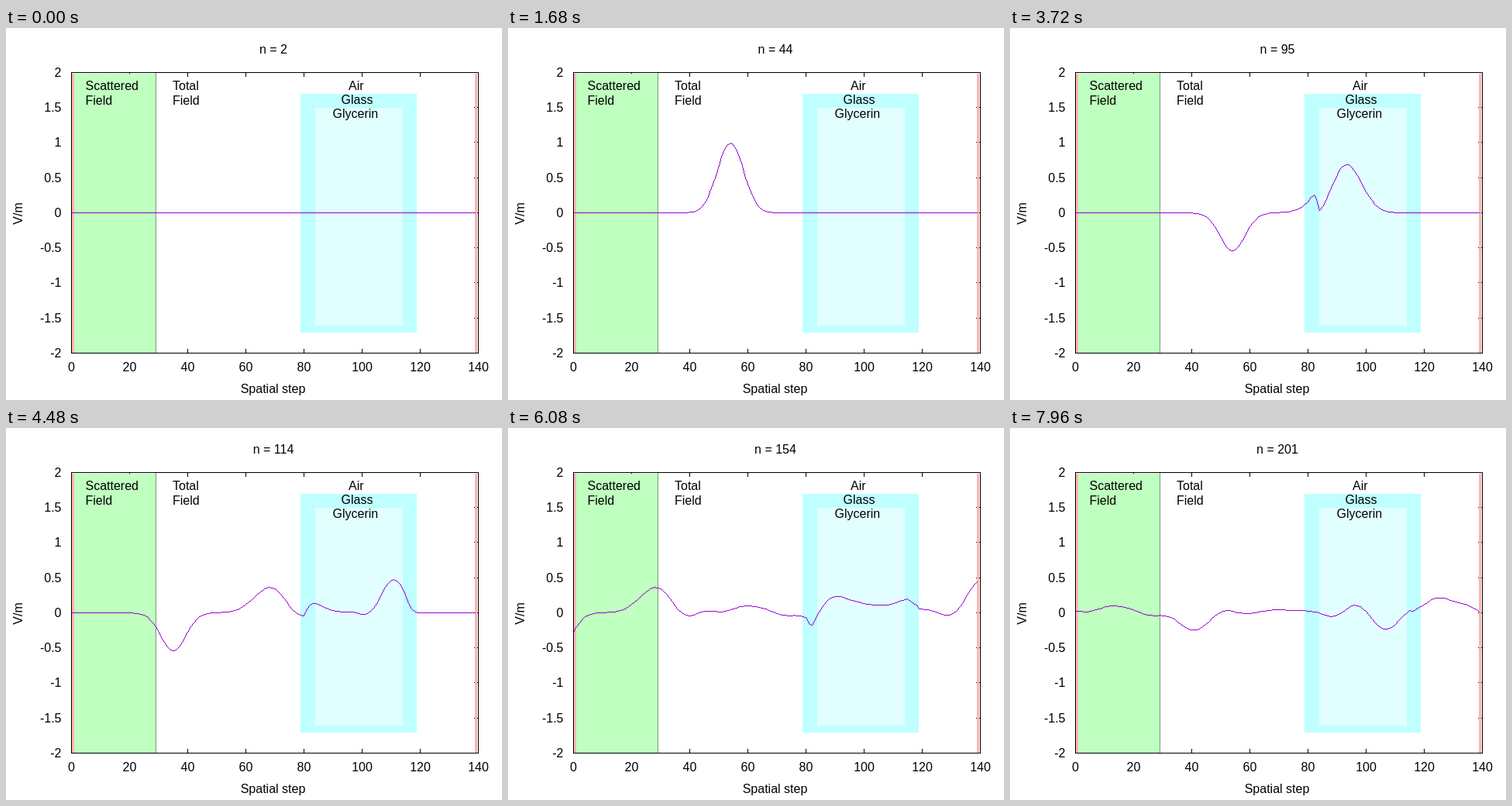
Animation, 640 px wide and 480 px high, one loop 8 s. Source, as an HTML page with a canvas:

```html
<!DOCTYPE html>
<html lang="en">
<head>
<meta charset="utf-8">
<title>Pulse through glass and glycerin</title>
<style>
  html, body { margin: 0; width: 100%; height: 100%; overflow: hidden; background: #fff; }
  svg, canvas { position: absolute; left: 0; top: 0; width: 640px; height: 480px; }
  text { font: 16px "Liberation Sans", Arial, sans-serif; fill: #000; }
  .mid { text-anchor: middle; }
  .end { text-anchor: end; }
  rect { shape-rendering: crispEdges; }
</style>
</head>
<body>
<svg viewBox="0 0 640 480">
  <g id="ticks"></g>
  <rect x="85" y="59" width="3" height="360" fill="#ffb3b3"/>
  <rect x="605" y="59" width="3" height="360" fill="#ffb3b3"/>
  <rect x="88" y="59" width="105" height="360" fill="#bfffbf"/>
  <rect x="193" y="58" width="1" height="361" fill="#70a070"/>
  <rect x="380" y="85" width="150" height="308" fill="#bfffff"/>
  <rect x="399" y="103" width="113" height="281" fill="#e2ffff"/>
  <rect x="84.5" y="57.5" width="525" height="362" fill="none" stroke="#000"/>
  <text id="title" class="mid" x="345" y="33">n = 2</text>
  <text class="mid" x="344.5" y="471">Spatial step</text>
  <text class="mid" transform="translate(21 239.5) rotate(-90)">V/m</text>
  <text x="102.5" y="80">Scattered</text>
  <text x="102.5" y="99">Field</text>
  <text x="215" y="80">Total</text>
  <text x="215" y="99">Field</text>
  <text x="442" y="80">Air</text>
  <text x="432.5" y="98">Glass</text>
  <text x="421.5" y="116">Glycerin</text>
</svg>
<canvas id="plot" width="640" height="480"></canvas>
<script>
const CELLS = 140, FRAMES = 200, FIRST_STEP = 2, FRAME_MS = 40;
const SOURCE = 30; // first cell of the total-field region

const px = x => Math.floor(84 + 3.75 * x + 0.5);
const py = v => 419 - Math.floor(90.5 * (v + 2) + 0.5);

function add(name, attrs, text = '') {
  const el = document.createElementNS('http://www.w3.org/2000/svg', name);
  for (const key in attrs) el.setAttribute(key, attrs[key]);
  el.textContent = text;
  document.getElementById('ticks').append(el);
}
const tick = (x, y, width, height) => add('rect', { x, y, width, height });

for (let x = 0; x <= 140; x += 20) {
  tick(px(x), 57, 1, 6);
  tick(px(x), 414, 1, 6);
  add('text', { x: px(x) + 0.5, y: 443, class: 'mid' }, x);
}
for (let v = -2; v <= 2; v += 0.5) {
  tick(84, py(v), 6, 1);
  tick(604, py(v), 6, 1);
  add('text', { x: 71.5, y: py(v) + 5.5, class: 'end' }, v);
}

// One-dimensional FDTD with Courant number 1 and a total-field/scattered-field source.
const isGlass = i => (i >= 80 && i < 85) || (i >= 115 && i < 120);
const permittivity = i => isGlass(i) ? 10 : 1;
const pulse = u => Math.exp(-((u + 10) ** 2) / 40);

function simulate(steps) {
  const e = new Float64Array(CELLS), h = new Float64Array(CELLS);
  const history = [e.slice()];
  for (let n = 0; n < steps; n++) {
    for (let i = 0; i < CELLS - 1; i++) h[i] += e[i + 1] - e[i];
    h[SOURCE - 1] -= pulse(n - SOURCE);
    const left = e[1], right = e[CELLS - 2];
    for (let i = 1; i < CELLS - 1; i++) e[i] += (h[i] - h[i - 1]) / permittivity(i);
    e[SOURCE] += pulse(n - SOURCE + 1);
    e[0] = left;
    e[CELLS - 1] = right;
    history.push(e.slice());
  }
  return history;
}

const history = simulate(FIRST_STEP + FRAMES);
const ctx = document.getElementById('plot').getContext('2d');
const title = document.getElementById('title');

// Hard-edged line, one pixel thick.
function pixelLine(x0, y0, x1, y1) {
  const count = Math.max(Math.abs(x1 - x0), Math.abs(y1 - y0));
  for (let k = 0; k <= count; k++) {
    const x = Math.round(x0 + (x1 - x0) * k / count);
    const y = Math.round(y0 + (y1 - y0) * k / count);
    if (x > 84) ctx.fillRect(x, y, 1, 1);
  }
}

let shown = -1;
function draw() {
  const n = FIRST_STEP + Math.floor(performance.now() / FRAME_MS) % FRAMES;
  if (n !== shown) {
    shown = n;
    title.textContent = `n = ${n}`;
    ctx.clearRect(0, 0, 640, 480);
    ctx.fillStyle = '#9400d3';
    const e = history[n];
    for (let i = 1; i < CELLS; i++) pixelLine(px(i - 1), py(e[i - 1]), px(i), py(e[i]));
  }
  requestAnimationFrame(draw);
}
draw();
</script>
</body>
</html>
```
